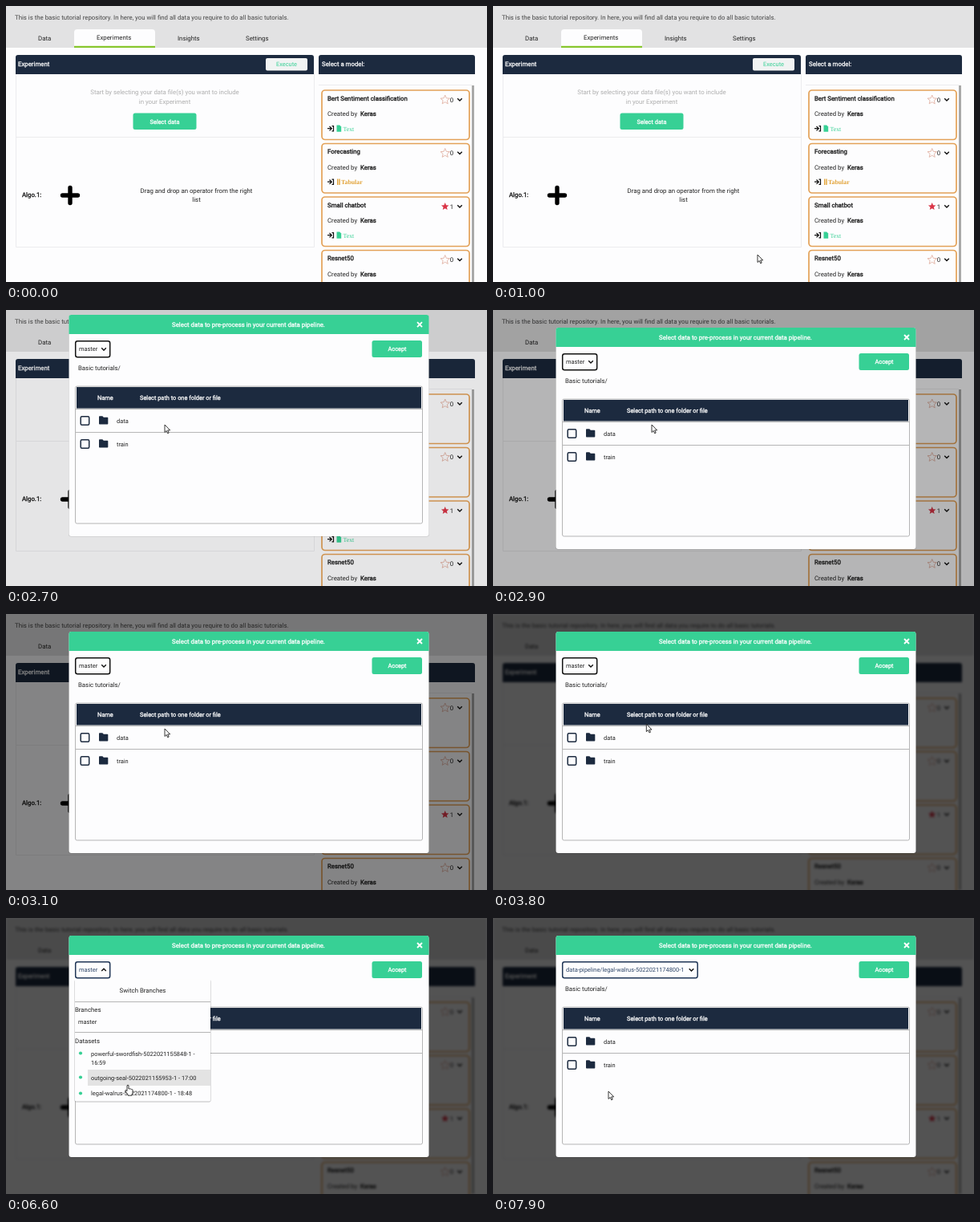
Animation of 600x344 px, one loop 8 s. Source, as an HTML page:

```html
<!DOCTYPE html>
<html lang="en">
<head>
<meta charset="utf-8">
<title>Select data for an experiment</title>
<style>
  html, body { margin: 0; width: 100%; height: 100%; overflow: hidden; background: #fdfdfe; }
  svg { display: block; width: 100vw; height: 100vh; }
  text { font: 7.82px Roboto, sans-serif; fill: #222; text-rendering: geometricPrecision; }
  .small { font-size: 7.42px; }
  .bold { stroke: currentColor; stroke-width: .3px; color: #111; fill: #111; }
  .white { fill: #fff; color: #fff; }
  .mid { text-anchor: middle; }
  .pale { fill: #adadad; }
  .type { font-family: "Liberation Serif", serif; }
  .navy { fill: #1c2a3f; }
  .green { fill: #37d095; }
  .rule { stroke: #b5b5b5; stroke-width: 1; fill: none; }
  .faint { stroke: #ececee; stroke-width: 1; fill: none; }
  .line { fill: none; stroke: #111; stroke-width: 1.4; }
</style>
</head>
<body>
<svg viewBox="0 0 600 344" preserveAspectRatio="none">
  <g id="page">
    <rect width="600" height="344" fill="#fdfdfe"/>
    <rect width="600" height="52" fill="#e2e2e3"/>
    <text x="11" y="17.3" style="fill:#444">This is the basic tutorial repository. In here, you will find all data you require to do all basic tutorials.</text>
    <path d="M85 52V33q0-4 4-4h93q4 0 4 4v19z" fill="#fdfdfe"/>
    <rect x="85" y="49.8" width="101" height="2.2" fill="#86c62c"/>
    <text x="40" y="42.6">Data</text>
    <text x="113" y="41.6">Experiments</text>
    <text x="214" y="42.6">Insights</text>
    <text x="299" y="42.6">Settings</text>

    <path class="faint" d="M12.5 85V300.5H384.5V85M12 163.5H384M390 98.5H581"/>
    <path class="navy" d="M12 85V64q0-3 3-3h366q3 0 3 3v21zM390 85V64q0-3 3-3h189q3 0 3 3v21z"/>
    <text class="bold white" x="15" y="75.3">Experiment</text>
    <rect x="324" y="65" width="52" height="15.5" rx="2" fill="#f1f3f3"/>
    <text class="small mid" x="350" y="75.3" style="fill:#37d095">Execute</text>
    <text class="bold white" x="394" y="75.3">Select a model:</text>

    <text class="mid pale" x="198" y="110.4">Start by selecting your data file(s) you want to include</text>
    <text class="mid pale" x="198" y="122">in your Experiment</text>
    <rect id="selectData" x="158.5" y="133.5" width="79" height="20.5" rx="2.5"/>
    <text class="small mid bold white" x="198" y="146.5">Select data</text>

    <text class="bold" x="20" y="238.4">Algo.1:</text>
    <path d="M70.500 236h19M80 226.500v19" stroke="#000" stroke-width="5.4" stroke-linecap="round"/>
    <text class="mid" x="237.500" y="232.500">Drag and drop an operator from the right</text>
    <text class="mid" x="237.500" y="244.200">list</text>

    <g id="cards"></g>
    <rect x="581" y="99" width="3" height="245" fill="#a9a9a9"/>
  </g>

  <rect id="shade" width="600" height="344"/>

  <g id="modal">
    <rect x="78" y="22" width="450" height="276.500" rx="3" fill="#000" opacity=".15"/>
    <rect x="78.500" y="22" width="449" height="276" rx="3" fill="#fdfdfe"/>
    <path class="green" d="M78.500 46V25q0-3 3-3h443q3 0 3 3v21z"/>
    <text class="mid bold white" x="302.500" y="36.600">Select data to pre-process in your current data pipeline.</text>
    <path d="M513 31l6 6m0-6l-6 6" stroke="#fff" stroke-width="1.900"/>
    <rect class="green" x="456.500" y="54" width="62.500" height="21" rx="2.500"/>
    <text class="small mid bold white" x="488" y="67.200">Accept</text>
    <text x="90" y="91">Basic tutorials/</text>
    <rect class="rule" x="86.500" y="111" width="433" height="171" rx="2"/>
    <rect class="navy" x="88" y="112" width="430" height="26.500"/>
    <text class="small bold white" x="114" y="128">Name</text>
    <text class="small bold white" x="167" y="128">Select path to one folder or file</text>
    <path class="rule" d="M87 139.500H519M87 168.500H519"/>
    <g id="rows"></g>
    <rect id="branchBox" x="86.700" y="54.700" height="20" rx="2.500" fill="#fdfdfe" stroke-width="1.500"/>
    <text id="branch" class="small" x="91" y="67.200"></text>
    <path id="branchArrow" class="line"/>
    <g id="menu">
      <rect x="85.500" y="77" width="170" height="152.500" rx="2" fill="#000" opacity=".25"/>
      <rect x="86" y="76.500" width="169" height="152" rx="1" fill="#fdfdfe"/>
      <rect id="hover" x="102" width="153" fill="#e3e3e3"/>
      <path class="rule" d="M86 104.500H255M86 142.500H255"/>
      <text class="mid" x="170.500" y="93">Switch Branches</text>
      <text x="86" y="117">Branches</text>
      <text class="small" x="90" y="132.200">master</text>
      <text x="86" y="155.700">Datasets</text>
      <text class="small" x="106" y="172">powerful-swordfish-5022021155848-1 -</text>
      <text class="small" x="106" y="183">16:59</text>
      <text class="small" x="106" y="201.800">outgoing-seal-5022021155953-1 - 17:00</text>
      <text class="small" x="106" y="221.300">legal-walrus-5022021174800-1 - 18:48</text>
      <g class="green"><circle cx="93" cy="168.500" r="2.100"/><circle cx="93" cy="198.500" r="2.100"/><circle cx="93" cy="218.500" r="2.100"/></g>
    </g>
  </g>

  <g id="cursor" fill="#fff" stroke="#222" stroke-width=".9" stroke-linejoin="round">
    <path id="arrow" d="M0 0v9.500l2.200-2 1.500 3.300 1.500-.7-1.500-3.200h3z"/>
    <path id="hand" d="M-1 .8q1-1.500 2 0V5q1-1 1.800.2 1-.8 1.700.4 1.300-.5 1.500.8V9q0 1.500-1 3v1.200H0V12L-3 8q-.6-1.600.8-1.500L-1 7.600z"/>
  </g>
</svg>

<script>
const LOOP = 8000, STEP = 100;
const $ = id => document.getElementById(id);
const clamp = v => Math.max(0, Math.min(1, v));
const ramp = (t, from, to) => clamp((t - from) / (to - from));
const smooth = u => u * u * (3 - 2 * u);
const easeOut = u => 1 - (1 - u) ** 1.65;
const show = (id, on) => $(id).style.display = on ? '' : 'none';

const starPoints = (cx, cy, r) => Array.from({ length: 10 }, (_, i) => {
  const a = i * Math.PI / 5 - Math.PI / 2, d = i % 2 ? r * .45 : r;
  return `${(cx + d * Math.cos(a)).toFixed(2)},${(cy + d * Math.sin(a)).toFixed(2)}`;
}).join(' ');

const chevron = (x, y, dir) => `M${x - 2.8} ${y - 1.4 * dir}l2.8 ${2.8 * dir} 2.8 ${-2.8 * dir}`;

function card([title, stars, type], i) {
  const tabular = type === 'Tabular', color = tabular ? '#e2a338' : '#37d095';
  const icon = tabular
    ? '<path d="M413.700 49v7.500m2.300-7.500v7.500" stroke="#e2a338" stroke-width="1.400"/>'
    : '<path d="M412.500 48.500h3.700l2 2v6.300h-5.700z" fill="#37d095"/>';
  return `<g transform="translate(0 ${(i * 66.5).toFixed(1)})">
    <rect x="394" y="105" width="184" height="61.5" rx="4" fill="#fdfdfe" stroke="#e3a157" stroke-width="1.7"/>
    <text class="bold" x="401" y="117.7">${title}</text>
    <polygon points="${starPoints(547.7, 117, stars ? 5 : 6)}" fill="${stars ? '#da3547' : 'none'}"
      stroke="${stars ? 'none' : '#e2b3a4'}" stroke-width=".9"/>
    <text x="553.8" y="119.5">${stars}</text>
    <path class="line" d="${chevron(566, 116.700, 1)}"/>
    <text x="401" y="137.400">Created by</text><text class="bold" x="442" y="137.400">Keras</text>
    <path class="line" style="stroke-width:1.200" d="M401 152.700h5M403.500 150l2.800 2.700-2.800 2.700M406.500 149.600h2v6.200h-2"/>
    <g transform="translate(0 100)">${icon}</g>
    <text class="type" x="${tabular ? 418 : 420.5}" y="155.500"
      style="fill:${color};font-weight:${tabular ? 700 : 400}">${type}</text>
  </g>`;
}

$('cards').innerHTML = [
  ['Bert Sentiment classification', 0, 'Text'], ['Forecasting', 0, 'Tabular'],
  ['Small chatbot', 1, 'Text'], ['Resnet50', 0, 'Text'],
].map(card).join('');

$('rows').innerHTML = ['data', 'train'].map((name, i) => `<g transform="translate(0 ${i * 29})">
  <rect x="93.200" y="148.700" width="10.500" height="10.500" rx="1.500" fill="none" stroke="#1c2a3f" stroke-width="1.500"/>
  <path class="navy" d="M116 149q0-.8.8-.8h3.500l1.500 1.500h4.700q.8 0 .8.800v7.200q0 .8-.8.800h-9.700q-.8 0-.8-.8z"/>
  <text class="small" x="138" y="156.700">${name}</text></g>`).join('');

// Pointer stops: time, x, y
const path = [
  [1000, 330, 310], [1700, 198, 143], [3700, 198, 143], [4300, 108, 64], [4500, 108, 64],
  [5100, 149, 118], [5300, 149, 149], [5600, 150, 172], [5700, 150, 172], [6100, 152, 196],
  [6300, 152, 196], [6600, 152, 208], [6800, 147, 216], [7000, 147, 216], [7300, 144, 216],
];

function pointerAt(t) {
  const next = path.findIndex(p => p[0] > t);
  if (next < 0) return path.at(-1).slice(1);
  const a = path[Math.max(0, next - 1)], b = path[next];
  const u = smooth(ramp(t, a[0], b[0]));
  return [a[1] + (b[1] - a[1]) * u, a[2] + (b[2] - a[2]) * u];
}

function draw(t) {
  const [x, y] = pointerAt(t);
  const modalOpen = t >= 2600, menuOpen = t >= 4500 && t < 7900, chosen = t >= 7900;
  const overButton = !modalOpen && Math.abs(x - 198) < 39 && Math.abs(y - 144) < 10;
  const overItem = menuOpen && y >= 159;

  $('selectData').style.fill = overButton || modalOpen ? '#28a873' : '#37d095';
  $('shade').style.opacity = .67 * ramp(t, 2600, 3300);
  const blur = 1.6 * ramp(t, 3100, 3700);
  $('page').style.filter = blur ? `blur(${blur}px)` : 'none';

  show('modal', modalOpen);
  $('modal').style.opacity = ramp(t, 2550, 2700);
  $('modal').setAttribute('transform', `translate(0 ${-50 * (1 - easeOut(ramp(t, 2550, 2850)))})`);

  const boxWidth = chosen ? 168.5 : 43;
  $('branchBox').setAttribute('width', boxWidth);
  $('branchBox').style.stroke = t < 4500 ? '#111' : '#1f3556';
  $('branch').textContent = chosen ? 'data-pipeline/legal-walrus-5022021174800-1' : 'master';
  $('branch').style.fill = t < 4500 ? '#222' : '#2c4468';
  $('branchArrow').setAttribute('d', chevron(79 + boxWidth, 64.7, menuOpen ? -1 : 1));

  show('menu', menuOpen);
  show('hover', overItem);
  const [top, bottom] = y < 189 ? [159, 189] : y < 209 ? [189, 209] : [209, 228];
  $('hover').setAttribute('y', top);
  $('hover').setAttribute('height', bottom - top);

  const hand = overButton || (overItem && t < 7200);
  show('cursor', t >= 1000);
  show('hand', hand);
  show('arrow', !hand);
  $('cursor').setAttribute('transform', `translate(${x} ${y})`);
}

function tick() {
  const t = (performance.now() + 1) % LOOP;
  draw(Math.floor(t / STEP) * STEP);
  requestAnimationFrame(tick);
}
tick();
</script>
</body>
</html>
```
